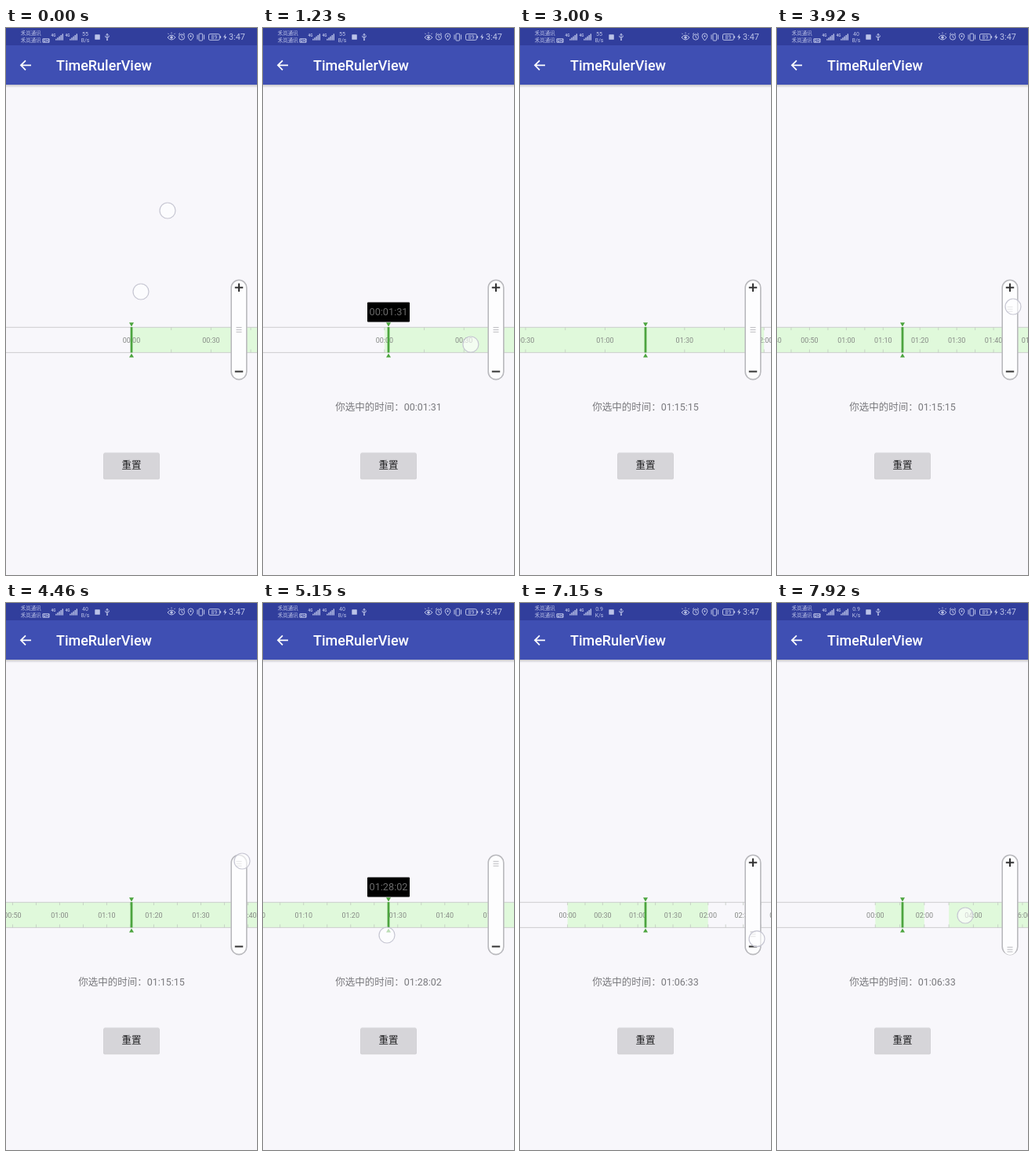
An HTML page that plays this animation: 320x695 px, repeating every 8000 ms.

```html
<!DOCTYPE html>
<html lang="zh-CN">
<head>
<meta charset="utf-8">
<title>TimeRulerView</title>
<style>
html, body { margin: 0; width: 100%; height: 100%; overflow: hidden; background: #f8f7fb; }
svg { display: block; width: 100vw; height: 100vh; }
text { font-family: Roboto, "Noto Sans CJK SC", "Noto Sans CJK", sans-serif; }
.mid { text-anchor: middle; }
.status { fill: #bcc3e8; }
.icon { fill: none; stroke: #bcc3e8; stroke-width: 1; }
</style>
</head>
<body>
<svg viewBox="0 0 320 695">
  <defs>
    <linearGradient id="shade" x2="0" y2="1">
      <stop stop-color="#000" stop-opacity=".2"/>
      <stop offset="1" stop-color="#000" stop-opacity="0"/>
    </linearGradient>
  </defs>
  <rect width="320" height="695" fill="#f8f7fb"/>

  <!-- app bar -->
  <rect y="72" width="320" height="4" fill="url(#shade)"/>
  <rect width="320" height="72" fill="#3f4fb3"/>
  <rect width="320" height="22" fill="#313e9c"/>
  <path d="M32 47.3H19.5M25 41.3l-6 6 6 6" fill="none" stroke="#fff" stroke-width="1.8"/>
  <text x="64" y="54" font-size="18" font-weight="500" fill="#fff">TimeRulerView</text>

  <!-- status bar -->
  <g class="status" font-size="6.5">
    <text x="18.7" y="9">禾岚通讯</text>
    <text x="18.7" y="18.4">禾岚通讯</text>
    <rect x="46.5" y="13.2" width="9" height="5.6" rx="1"/>
    <text x="51" y="18" font-size="5" font-weight="700" class="mid" style="fill:#313e9c">HD</text>
    <g id="signals"></g>
    <text id="speed" class="mid" x="101" y="10" font-size="7"></text>
    <text id="unit" class="mid" x="101" y="18" font-size="6.8"></text>
    <rect x="113.3" y="8.3" width="6.5" height="6.5" rx=".6"/>
    <text x="284" y="15.2" font-size="10.8">3:47</text>
    <text x="265.5" y="14" font-size="7" class="mid">89</text>
    <path d="M280 7.5l-3 4.3h2l-.6 3.6 3-4.4h-2z"/>
    <circle cx="211" cy="12" r="1.8"/>
    <circle cx="235.5" cy="10.4" r="1.1"/>
    <circle cx="129" cy="15" r="1"/>
  </g>
  <g class="icon">
    <path d="M129 15V7.5m-1.3 1.5l1.3-1.8 1.3 1.8M126.8 9.8v1.6l2.2 1.4 2.2-1.6V9.5"/>
    <path d="M206 12q5-6 10 0q-5 6-10 0M207.5 8l-1-1.2M211 7V5.6M214.5 8l1-1.2"/>
    <circle cx="224" cy="11.5" r="3.6"/>
    <path d="M224 9.3v2.4l1.6 1M220 8.2l2-1.8M228 8.2l-2-1.8"/>
    <path d="M235.5 16q-3.4-3.6-3.4-5.6a3.4 3.4 0 0 1 6.8 0q0 2-3.4 5.6z"/>
    <rect x="246" y="7.2" width="4.6" height="8.8" rx=".8"/>
    <path d="M244 8.5v6M252.6 8.5v6"/>
    <rect x="258.5" y="7.7" width="13.8" height="7.6" rx="1.6"/>
    <path d="M273.6 10v3"/>
  </g>

  <!-- ruler -->
  <g id="ruler"></g>
  <path d="M0 380.3H320M0 412.4H320" stroke="#c9c9cb" stroke-width=".9"/>
  <g fill="#4ca53f">
    <rect x="158.6" y="380" width="2.8" height="32.4"/>
    <path d="M157 374.3h6l-3 5.2zM157 418.6h6l-3-5.2z"/>
  </g>
  <g id="popup">
    <rect x="133" y="348.6" width="54" height="25" rx="1"/>
    <text id="popupTime" class="mid" x="160" y="365.4" font-size="12.7" fill="#6c6c6c"></text>
  </g>

  <!-- zoom slider -->
  <rect x="287.2" y="320.2" width="19.6" height="126.4" rx="9.8" fill="#fdfdfe" stroke="#b9b9bd" stroke-width="1.6"/>
  <path d="M291.8 329.7h10.4M297 324.5v10.4M291.8 436.4h10.4" stroke="#333" stroke-width="2"/>
  <g id="thumb">
    <rect x="289" y="-9" width="16" height="16" rx="8" fill="#fdfdfe"/>
    <path d="M293.5 -2.7h7M293.5 .2h7M293.5 3.1h7" stroke="#b4b4b8" stroke-width=".9"/>
  </g>

  <text id="selected" class="mid" x="160" y="486" font-size="12.5" fill="#79797d"></text>

  <rect x="124" y="540.5" width="72" height="33" rx="2" fill="#000" opacity=".16"/>
  <rect x="124.5" y="539.5" width="71" height="32.8" rx="1.5" fill="#d6d5d9"/>
  <text class="mid" x="160" y="560.4" font-size="12.5" font-weight="500" fill="#1d1d1f">重置</text>

  <g id="touches" fill="#fff" fill-opacity=".62" stroke="#c6c6d2" stroke-width="1.2"></g>
</svg>
<script>
const LOOP = 8000, FRAME = 1000 / 13;
const SCALE_MIN = 0.521, SCALE_MAX = 6, THUMB_TOP = 331, THUMB_BOTTOM = 440;
const RECORDED = [[0, 120], [180, 400]];   // minutes
const $ = id => document.getElementById(id);

const ease = {
  linear: u => u,
  in: u => u * u,
  out: u => 1 - (1 - u) ** 2,
  both: u => u * u * (3 - 2 * u)
};

// Each key is [time, value, easing used to reach it].
function track(keys, time) {
  const i = keys.findIndex(key => key[0] > time);
  if (i === 0) return keys[0][1];
  if (i < 0) return keys[keys.length - 1][1];
  const [t0, v0] = keys[i - 1], [t1, v1, kind = 'linear'] = keys[i];
  return v0 + (v1 - v0) * ease[kind]((time - t0) / (t1 - t0));
}

const minuteKeys = [
  [1000, 0], [1600, 10.28, 'in'], [2538, 75.26, 'out'], [4846, 75.26],
  [5153.8, 88.04], [5310, 91, 'out'], [5690, 78, 'in'], [6150, 66.56, 'out']
];
const scaleKeys = [
  [3461, 3.379], [4384, 6, 'both'], [6615, 6], [7153, 1.5], [7400, 0.521, 'out']
];

// Fingers: start, end, and position for the state { minute, thumb, time }.
const fingers = [
  [-200, 230, () => [206, 232]],
  [-200, 230, () => [172, 335]],
  [920, 1650, s => [270 - s.minute * 3.379, 402]],
  [3380, 4690, s => [301, s.thumb - 3]],
  [4840, 5700, s => [158 + (88.04 - s.minute) * 6, track([[4846, 412], [5154, 422]], s.time)]],
  [6380, 7690, s => [302, s.thumb + 6]],
  [7840, 8400, () => [240, 397]]
];

const pad = n => String(n).padStart(2, '0');
const hourMinute = m => `${pad(Math.floor(m / 60))}:${pad(m % 60)}`;
const clock = m => `${hourMinute(Math.floor(m))}:${pad(Math.floor(m * 60) % 60)}`;
const between = (time, from, to) => time >= from && time < to;

function rulerMarkup(minute, scale) {
  const toX = m => 160 + (m - minute) * scale;
  const labelStep = scale >= 4.27 ? 10 : scale >= 1.33 ? 30 : scale >= 0.747 ? 60 : 120;
  const tickStep = labelStep / 2;
  let markup = '';
  for (const [from, to] of RECORDED)
    markup += `<rect x="${toX(from)}" y="380" width="${(to - from) * scale}" height="32.4" fill="#e0f9db"/>`;
  const first = Math.max(0, Math.floor((minute - 180 / scale) / tickStep) * tickStep);
  for (let m = first; m <= 1440 && toX(m) < 340; m += tickStep) {
    const x = toX(m);
    markup += `<path d="M${x} 380v4M${x} 408.4v4" stroke="#c2cac0" stroke-width=".8"/>`;
    if (m % labelStep === 0)
      markup += `<text class="mid" x="${x}" y="400.2" font-size="9" fill="#868a86">${hourMinute(m)}</text>`;
  }
  return markup;
}

function touchMarkup(state) {
  return fingers.map(([from, to, place]) => {
    if (!between(state.time, from, to)) return '';
    const [x, y] = place(state);
    const opacity = Math.min(1, (state.time - from + 60) / 130, (to - state.time) / 160);
    return `<circle cx="${x}" cy="${y}" r="10" opacity="${opacity}"/>`;
  }).join('');
}

function draw(time) {
  const minute = track(minuteKeys, time), scale = track(scaleKeys, time);
  const thumb = THUMB_BOTTOM - (scale - SCALE_MIN) / (SCALE_MAX - SCALE_MIN) * (THUMB_BOTTOM - THUMB_TOP);
  const scrolling = between(time, 1070, 2760) || between(time, 4915, 6375);

  $('ruler').innerHTML = rulerMarkup(minute, scale);
  $('thumb').setAttribute('transform', `translate(0 ${thumb})`);
  $('popup').style.display = scrolling ? '' : 'none';
  $('popupTime').textContent = clock(minute);
  $('selected').textContent = time < 1070 ? '' : '你选中的时间：' + clock(minute);
  $('speed').textContent = time < 3700 ? '55' : time < 6900 ? '40' : '0.9';
  $('unit').textContent = time < 6900 ? 'B/s' : 'K/s';
  $('touches').innerHTML = touchMarkup({ time, minute, thumb });
}

$('signals').innerHTML = [58, 76].map(x => {
  let bars = `<text x="${x - .5}" y="10.5" font-size="4.6" font-weight="700">4G</text>`;
  for (let i = 0; i < 5; i++) {
    const height = 1.8 + i * 1.6;
    bars += `<rect x="${x + 5.2 + i * 2.1}" y="${15.6 - height}" width="1.4" height="${height}"/>`;
  }
  return bars;
}).join('');

let shown = -1;
function tick(now) {
  const step = Math.floor((now % LOOP + 4.9) / FRAME) % 104;
  if (step !== shown) draw((shown = step) * FRAME);
  requestAnimationFrame(tick);
}
tick(performance.now());
</script>
</body>
</html>
```
